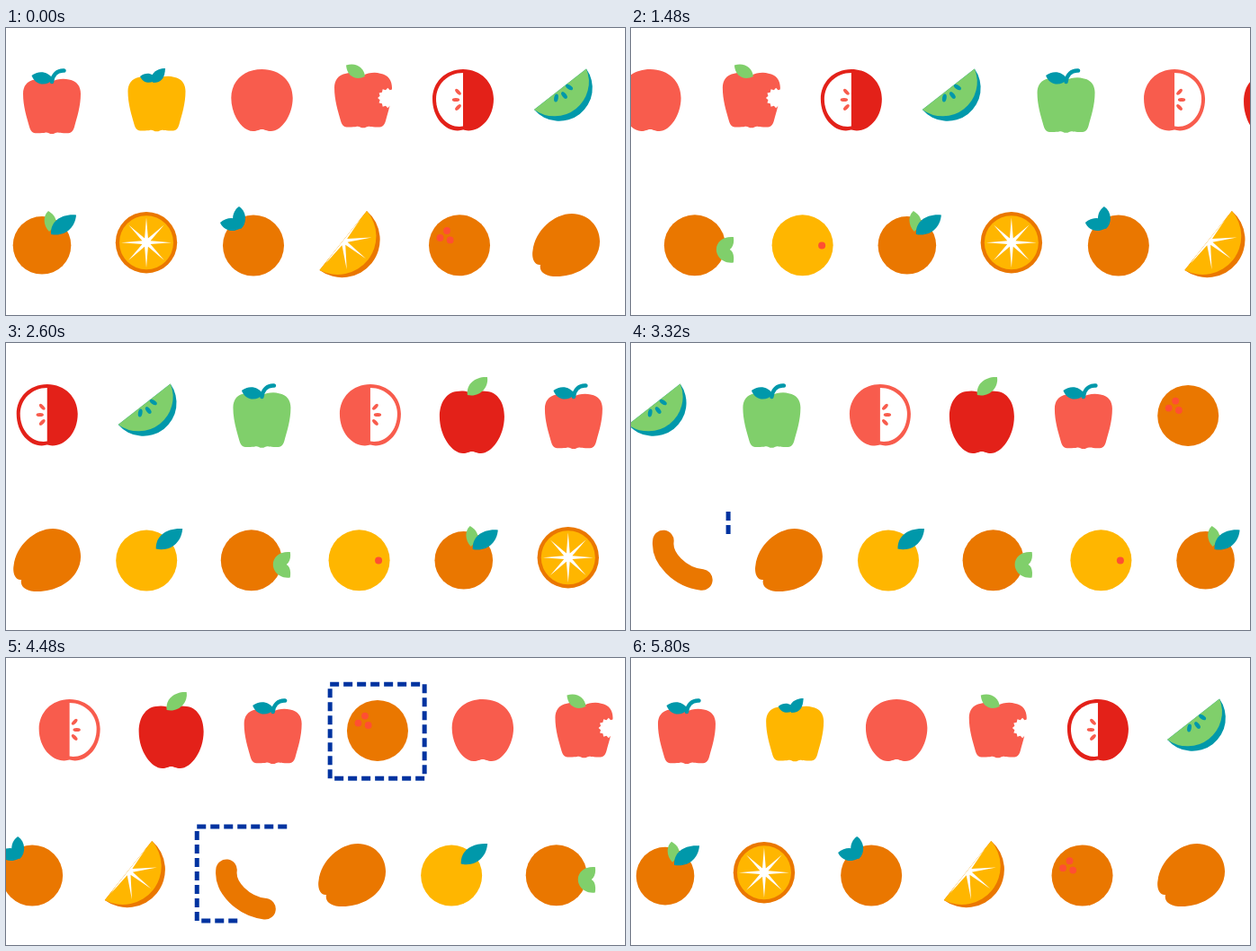
These frames come from a looping animation (688 by 320 pixels, 5.84 s). An HTML page:

```html
<!DOCTYPE html>
<html lang="en">
<head>
<meta charset="utf-8">
<title>Fruit sorting</title>
<style>
  html, body { margin: 0; width: 100%; height: 100%; overflow: hidden; background: #fff; }
  svg { display: block; width: 688px; height: 320px; }
</style>
</head>
<body>
<svg id="stage" viewBox="0 0 688 320"></svg>
<script>
const LOOP = 5840, STEP = 40;
const V_TOP = -0.1778, V_LOW = 0.1803;
const CORAL = '#f85c4d', RED = '#e32119', YELLOW = '#ffb600', ORANGE = '#ea7700',
      GREEN = '#80cf6b', TEAL = '#0098aa', BLUE = '#0033a0', DOT = '#ff4f32';

// Shape helpers
const path = (d, fill) => `<path d="${d}" fill="${fill}"/>`;
const disc = (x, y, r, fill) => `<circle cx="${x}" cy="${y}" r="${r}" fill="${fill}"/>`;
const seed = (x, y, turn, fill, rx = 4.2, ry = 2) =>
  `<ellipse rx="${rx}" ry="${ry}" fill="${fill}" transform="translate(${x} ${y}) rotate(${turn})"/>`;
const place = (x, y, inner, extra = '') => `<g transform="translate(${x} ${y}) ${extra}">${inner}</g>`;

function star(points, outer, inner) {
  let d = '';
  for (let i = 0; i < points * 2; i++) {
    const r = i % 2 ? inner : outer, a = i * Math.PI / points;
    d += `${i ? 'L' : 'M'}${(r * Math.cos(a)).toFixed(2)} ${(r * Math.sin(a)).toFixed(2)}`;
  }
  return d + 'Z';
}

const BODY = 'M0 2.5C-5-.5-13-1.5-19 .2C-28 1.5-32 8-32 16C-32 30-28 42-25 53C-23.5 58.500-21 60.200-16 60' +
  'C-12 59.800-9 60.200-7 59.300C-5 58.500-3 60.800 0 60.800C3 60.800 5 58.500 7 59.300C9 60.200 12 59.800 16 60' +
  'C21 60.200 23.500 58.500 25 53C28 42 32 30 32 16C32 8 28 1.500 19 .2C13-1.500 5-.5 0 2.500Z';
const body = (y, fill) => place(0, y, path(BODY, fill));

// Upper row fruit
const stemmed = (y, fill) => body(y, fill) +
  path('M-22.500 53C-15 47-4 48 1 57C-5 65-18 65-22.500 53Z', TEAL) +
  `<path d="M0 60C1 52 6 47 13.500 47.500" fill="none" stroke="${TEAL}" stroke-width="4.500" stroke-linecap="round"/>`;
const pepper = stemmed(57.3, CORAL);
const green = stemmed(56, GREEN);
const yellow = body(54.5, YELLOW) +
  path('M-18.500 54C-12 48.500-4 50 0 57C-6 63-15 62-18.500 54Z', TEAL) +
  path('M9.500 45C9 55 6 61-4 61C-9 52-1 45 9.500 45Z', TEAL);
const round = path('M0 46C21 46 34.200 60 34.200 78C34.200 97 22 115 10 115C5 115 3 113 0 113' +
  'C-3 113-5 115-10 115C-22 115-34.200 97-34.200 78C-34.200 60-21 46 0 46Z', CORAL);
const bitten = body(50.5, CORAL) +
  path('M-19 41.500C-8 38 1 44 2 54C-8 59-18 54-19 41.500Z', GREEN) +
  place(27.3, 78, path(star(12, 11.2, 9), '#fff'));
const half = fill => path('M0 46C20 46 34 61 34 79C34 100 20 114.500 6 114.500C3 114.500 2 113.600 0 113.600' +
  'C-2 113.600-3 114.500-6 114.500C-20 114.500-34 100-34 79C-34 61-20 46 0 46Z', fill) +
  path('M0 50C-17 50-30 63-30 79C-30 97-18 110-4 110L0 109.500Z', '#fff') +
  seed(-5.5, 71.3, 45, CORAL) + seed(-8, 80, 0, CORAL) + seed(-5.5, 88.5, -45, CORAL);
const slice = path('M25 45.500A36.900 36.900 0 0 1-33 91Z', TEAL) +
  path('M25 45.500A38.300 38.300 0 0 1-33 91Z', GREEN) +
  seed(-8.5, 78, 100, TEAL, 4.5, 2.3) + seed(.5, 75, 52, TEAL, 4.5, 2.3) + seed(6, 66, 32, TEAL, 4.5, 2.3);
const apple = path('M0 57C5 53 12 53 17 54C28 55 36 66 36 82C36 104 22 123 10 123C5 123 3 121 0 121' +
  'C-3 121-5 123-10 123C-22 123-36 104-36 82C-36 66-28 55-17 54C-12 53-5 53 0 57Z', RED) +
  path('M-5 58C-7 45 5 37 17 38C19 50 8 61-5 58Z', GREEN);

// Lower row fruit
const ball = (fill, r = 34, y = 242.3) => disc(0, y, r, fill);
const dotted = disc(0, 0, 34, ORANGE) + disc(-14, -16.3, 3.9, DOT) +
  disc(-21.5, -8.3, 3.9, DOT) + disc(-10.3, -5.9, 3.9, DOT);
const twoLeaf = ball(ORANGE, 32.3) +
  path('M8 227C1 220 1 209 7 204C14 208 18 215 14 221Z', GREEN) +
  path('M10 230C9 216 21 207 38 208.500C37 223 25 233 10 230Z', TEAL);
const cut = place(0, 239.2, disc(0, 0, 34.2, ORANGE) + disc(0, 0, 30, YELLOW) + path(star(8, 28, 5), '#fff'));
const tealLeaf = ball(ORANGE, 34, 242.5) +
  path('M-16 199C-7 205-7 218-14 224C-25 222-26 206-16 199Z', TEAL) +
  path('M-37 217C-28 209-16 211-12 220C-16 228-32 229-37 217Z', TEAL);
const FACE = 'M19 204A42.500 42.500 0 0 1-33.500 270Z';
const wedge = path('M19 204A42.200 42.200 0 0 1-33.500 270Z', ORANGE) +
  path('M19 204A42.900 42.900 0 0 1-33.500 270Z', YELLOW) +
  `<g clip-path="url(#face)">${place(-7.2, 237.5, path(star(8, 32, 5), '#fff'), 'rotate(-7)')}</g>`;
const lemon = path('M-28 264C-35 265-38 256-36.500 248C-34 226-13 207 7 207C25 207 38 221 38 238' +
  'C38 260 16 277-10 277C-22 277-30 272-28 264Z', ORANGE);
const spotted = ball(YELLOW) + disc(21.5, 242.6, 4, DOT);
const sideLeaf = ball(ORANGE) +
  path('M43 233C32 232 24 238 24 247C24 256 33 263 43 261.500C44 255 43 249 39 247C43 244 44 238 43 233Z', GREEN);
const topLeaf = ball(YELLOW, 34, 242.6) +
  path('M10.500 229.500C10 215 22 206 40 207C39 222 27 233 10.500 229.500Z', TEAL);
const banana = `<path id="banana" d="M-20.500 220.500C-23 240-2 261 22.500 264" fill="none"
  stroke="${ORANGE}" stroke-width="23.500" stroke-linecap="round"/>`;

// Each entry: position at time zero, drawing
const ORANGE_X = 1209.5, BANANA_X = -542.2, SLOT_X = -544.2;
const topRow = [
  [51, pepper], [167.5, yellow], [284.5, round], [397, bitten], [508, half(RED)], [620, slice],
  [746.7, green], [867.2, `<g transform="scale(-1 1)">${half(CORAL)}</g>`], [980.2, apple],
  [1093.2, pepper], [1213.4, `<g id="sprout">${yellow}</g>`], [1326.4, round], [1439, bitten],
  [1550.2, half(RED)], [1660.3, slice]
];
const lowRow = [
  [622, lemon], [504, place(0, 242.3, dotted)], [382, wedge], [275, tealLeaf], [156, cut], [40, twoLeaf],
  [-76.2, spotted], [-196, sideLeaf], [-312.6, topLeaf], [-423.7, lemon], [BANANA_X, banana],
  [-664.5, wedge], [-778.6, tealLeaf], [-897.8, cut], [-1007.7, place(0, .8, twoLeaf)]
];
const row = items => items.map(([x, art]) => place(x, 0, art)).join('');
const frame = (id, x, y) => `<path id="${id}" d="M${x} ${y}v105h-105v-105z" fill="none"
  stroke="${BLUE}" stroke-width="5"/>`;

const $ = id => document.getElementById(id);
$('stage').innerHTML = `<defs><clipPath id="face"><path d="${FACE}"/></clipPath></defs>
  <g id="low">${row(lowRow)}${frame('lowBox', BANANA_X + 51.7, 188)}<g id="close">
    ${disc(0, 0, 25, BLUE)}<path d="M-10.500-10.500L10.500 10.500M10.500-10.500L-10.500 10.500" stroke="#fff" stroke-width="6"/></g></g>
  <g id="top">${row(topRow)}${frame('topBox', ORANGE_X + 52.2, 29.3)}</g>
  <g id="mover">${dotted}</g>`;

// Timing helpers
const span = (t, a, b) => Math.min(1, Math.max(0, (t - a) / (b - a)));
const sine = p => .5 - .5 * Math.cos(Math.PI * p);
const back = p => p <= 0 ? 0 : 1 + 2.7 * (p - 1) ** 3 + 1.7 * (p - 1) ** 2;
const move = (id, x, y, k = 1) => $(id).setAttribute('transform', `translate(${x} ${y}) scale(${k})`);

// Dashes appear clockwise one by one, then leave in the same order
function outline(id, shown, gone) {
  const last = Math.ceil(28 * shown), first = Math.min(last, Math.ceil(28 * gone));
  $(id).setAttribute('stroke-dasharray', `0 ${first * 15} ${'10 5 '.repeat(last - first)}0 999`);
  $(id).style.display = last > first ? '' : 'none';
}

function draw(t) {
  move('top', V_TOP * t, 0);
  move('low', V_LOW * t, 0);

  outline('lowBox', span(t, 3300, 3800), span(t, 4300, 4760));
  outline('topBox', span(t, 3985, 4485), span(t, 4500, 4920));
  move('close', BANANA_X + 43.5, 193.6, back(span(t, 3760, 3960)) * (1 - span(t, 4240, 4400)));
  move('banana', 0, 130 * span(t, 4320, 4780) ** 2);

  const from = 4630, to = 5025, p = sine(span(t, from, to));
  const x0 = ORANGE_X + V_TOP * Math.min(t, from);
  const x1 = SLOT_X + V_LOW * Math.max(t, to);
  move('mover', x0 + (x1 - x0) * p, 80.9 + 161.6 * p);

  const k = back(span(t, 4955, 5355));
  move('sprout', 0, 74 * (1 - k), k);
}

const start = performance.now();
function tick(now) {
  const t = Math.max(0, now - start) % LOOP;
  draw(Math.floor(t / STEP) * STEP);
  requestAnimationFrame(tick);
}
draw(0);
requestAnimationFrame(tick);
</script>
</body>
</html>
```
